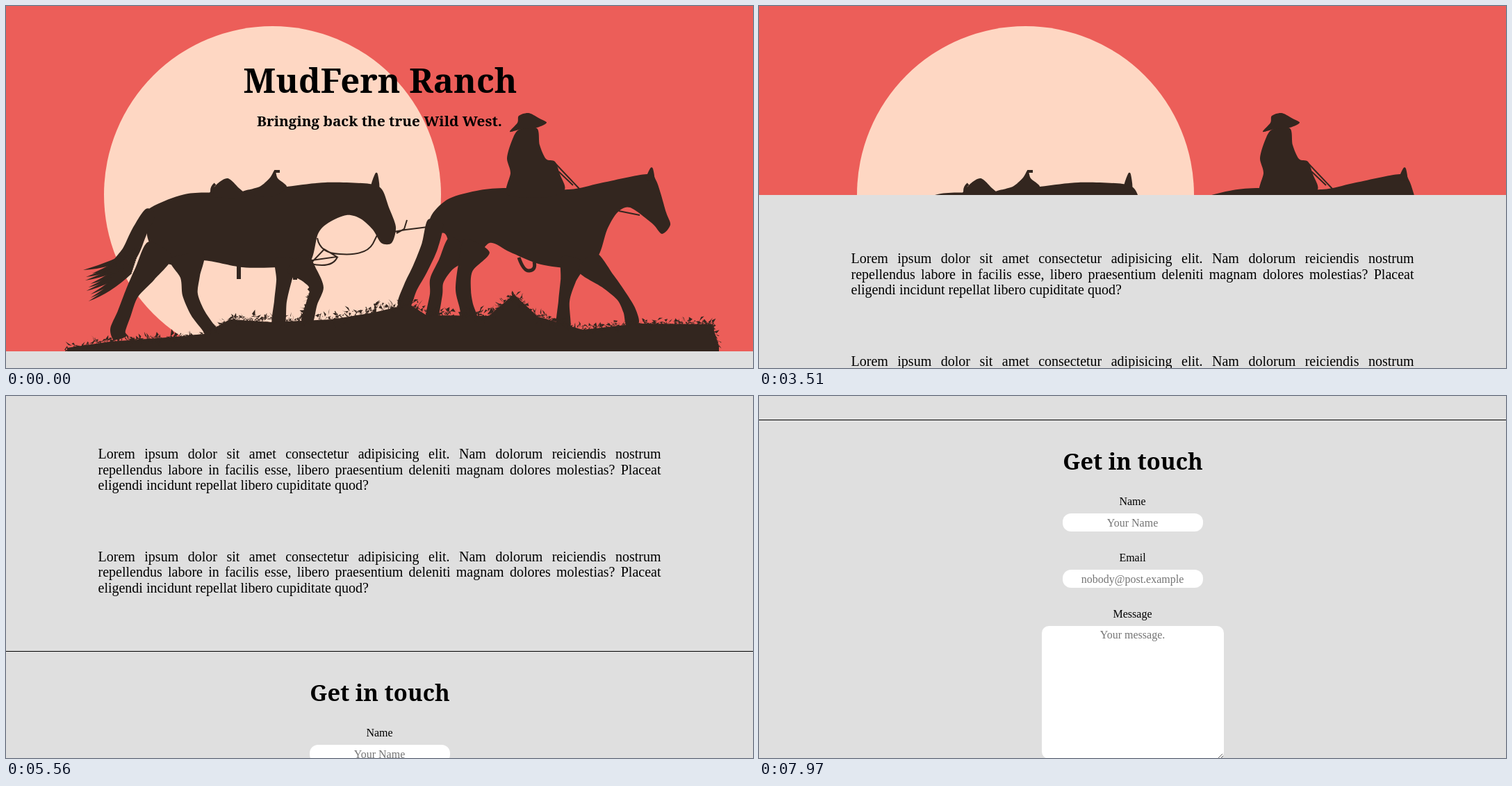
Write an HTML page that moves like this. It is 1075 px wide and 521 px high and loops after 8 s.

```html
<!DOCTYPE html>
<html lang="en">
<head>
<meta charset="utf-8">
<title>MudFern Ranch</title>
<style>
  html, body { margin: 0; width: 100%; height: 100%; overflow: hidden; }
  #stage { position: relative; width: 1075px; height: 521px; overflow: clip; contain: strict; background: #ec5e59; }
  svg, #page, p { position: absolute; left: 0; top: 0; }
  p { left: 132.5px; width: 810px; margin: 0; text-align: justify;
      font: 20px/22.5px "Liberation Serif", serif; color: #000; }
  text { text-anchor: middle; font: 16px "Liberation Serif", serif; }
  .show { font-family: "Noto Serif", serif; font-weight: 700; }
  .hint { fill: #757575; }
</style>
</head>
<body>
<div id="stage">
  <svg width="1075" height="521">
    <circle cx="383.5" cy="271.5" r="242.5" fill="#fed7c3"/>
    <g id="scene" fill="#33261f"></g>
    <g fill="none" stroke="#33261f" stroke-width="2">
      <path d="M448 334Q452 356 480 357Q518 360 528 342L534 330M438 371L458 350L476 361L440 366M438 371Q470 378 477 361"/>
      <path d="M558 325L575 322L607 318M562 327L573 321L577 308"/>
      <path d="M788 224L826 264M795 238L816 258M882 295L912 301"/>
      <path d="M301 256Q294 262 297 271M386 238h8" stroke-width="4"/>
      <path d="M738 362Q745 382 753 381Q763 380 760 368" stroke-width="5"/>
      <path d="M335 372V393M416 384V394" stroke-width="6"/>
    </g>
  </svg>
  <div id="page">
    <svg width="1075" height="1400">
      <text class="show" x="538.5" y="125" style="font-size:49px">MudFern Ranch</text>
      <text class="show" x="537.5" y="173" style="font-size:20.7px">Bringing back the true Wild West.</text>
      <rect y="497" width="1075" height="903" fill="#dfdfdf"/>
      <rect y="872" width="1075" height="1"/>
      <text class="show" x="538" y="944" style="font-size:32.7px">Get in touch</text>
      <g fill="#fff">
        <rect x="437" y="1007" width="202" height="26" rx="12"/>
        <rect x="437" y="1088" width="202" height="26" rx="12"/>
        <rect x="407" y="1169" width="262" height="191" rx="10"/>
      </g>
      <text x="537.5" y="995">Name</text>
      <text x="537.5" y="1026" class="hint">Your Name</text>
      <text x="537.5" y="1076">Email</text>
      <text x="537.5" y="1107" class="hint">nobody@post.example</text>
      <text x="537.5" y="1157">Message</text>
      <text x="537.5" y="1187" class="hint">Your message.</text>
      <path d="M661 1359l6 -6M665 1359l3 -3" stroke="#666"/>
    </svg>
  </div>
</div>
<script>
const scene = document.getElementById('scene');
const page = document.getElementById('page');
const parse = text => text.trim().split(/\s+/).map(p => p.split(',').map(Number));

let seed = 7;
const rand = () => (seed = seed * 16807 % 2147483647) / 2147483647;

function addPath(d) {
  const path = document.createElementNS('http://www.w3.org/2000/svg', 'path');
  path.setAttribute('d', d);
  scene.append(path);
}

// Closed smooth curve through the given points
function blob(pts) {
  const at = i => pts[(i + pts.length) % pts.length];
  const mix = (p, a, b) => [0, 1].map(k => p[k] + (a[k] - b[k]) / 7);
  let d = 'M' + pts[0];
  pts.forEach((p, i) => {
    const q = at(i + 1);
    d += `C${mix(p, q, at(i - 1))} ${mix(q, p, at(i + 2))} ${q}`;
  });
  addPath(d + 'z');
}
const shape = text => blob(parse(text));

// Tapered limb along a centre line of x,y,radius points
function limb(text) {
  const pts = parse(text), left = [], right = [];
  pts.forEach(([x, y, r], i) => {
    const a = pts[Math.max(i - 1, 0)], b = pts[Math.min(i + 1, pts.length - 1)];
    const angle = Math.atan2(b[1] - a[1], b[0] - a[0]);
    const dx = r * Math.sin(angle), dy = r * Math.cos(angle);
    left.push([x + dx, y - dy]);
    right.unshift([x - dx, y + dy]);
  });
  blob(left.concat(right));
}

// Leafy edge from one point to another
function leaves([x0, y0], [x1, y1], height) {
  const jit = () => (rand() - .5) * 12;
  let d = '';
  for (let n = Math.hypot(x1 - x0, y1 - y0); n > 0; n--) {
    const u = rand();
    d += `M${x0 + (x1 - x0) * u},${y0 + (y1 - y0) * u + 3 - rand() * height}l${jit()},${jit()}l${jit()},${jit()}z`;
  }
  addPath(d);
}

// Pack horse
shape(`202,300 216,286 262,270 330,268 404,260 460,254 523,256 541,264 551,290 561,318 555,341 540,341
  528,322 510,306 490,301 464,312 449,328 436,370 392,376 340,376 283,366 236,372 206,340`);
shape('294,274 303,257 319,248 334,261 345,275');
shape('340,268 365,260 380,247 387,236 391,248 404,261 380,275');
limb('531,262,6 533,242,2');
limb('222,350,20 200,385,16 181,414,10 170,443,10 161,466,11 164,478,9');
limb('260,360,24 265,390,14 265,415,11 275,440,10 289,460,9 302,478,9');
limb('404,365,16 400,395,11 395,425,9 392,460,9');
limb('418,368,18 437,388,13 447,406,10 440,428,8 433,455,8');
limb('208,296,8 192,325,11 179,354,12 160,378,10');
for (let i = 0; i < 10; i++) {
  const x = 111 + rand() * 14, y = 380 + i * 5;
  addPath(`M${188 - i},${348 + i * 3}Q155,${367 + i * 4} ${x},${y}Q150,${378 + i * 4} ${190 - i},${358 + i * 3}z`);
}

// Lead horse
shape(`606,330 613,300 638,277 682,265 722,262 810,264 855,255 922,242 936,252 950,297 956,315 944,328
  930,313 898,290 880,297 865,322 852,360 825,377 770,372 725,354 696,341 672,368 645,366 632,328`);
limb('927,250,6 929,234,2');
limb('655,345,20 633,372,12 620,395,10 619,415,9 612,452,8');
limb('678,345,20 661,378,11 658,408,11 662,430,10 669,455,10');
limb('817,365,17 809,395,11 803,425,8 802,466,10');
limb('836,368,18 866,396,12 886,418,8 897,438,9 902,458,9');
limb('618,310,11 610,345,12 596,378,11 582,405,10 572,432,9');

// Rider
shape('738,178 764,176 768,200 777,220 790,224 797,242 804,264 780,275 722,272 726,240 721,219 728,194');
shape('725,181 736,168 738,158 752,154 768,162 778,168 764,175 742,177');

// Ground profile: x, y, height of the growth that follows
const ground = parse(`88,492,6 150,483,5 245,476,4 285,472,5 322,451,9 382,455,9 470,451,10 530,441,14 580,429,14
  605,445,10 695,446,6 731,415,5 765,447,7 830,466,8 910,457,8 1016,458,8 1026,490,5`);
addPath('M88,521L' + ground.map(([x, y]) => [x, y]).join('L') + 'V521z');
ground.slice(1).forEach((p, i) => leaves(ground[i], p, ground[i][2]));
leaves([428, 450], [440, 416], 8);

for (const top of [577, 724.5]) {
  const p = document.createElement('p');
  p.style.top = top + 'px';
  p.textContent = 'Lorem ipsum dolor sit amet consectetur adipisicing elit. Nam dolorum reiciendis nostrum ' +
    'repellendus labore in facilis esse, libero praesentium deleniti magnam dolores molestias? Placeat ' +
    'eligendi incidunt repellat libero cupiditate quod?';
  page.append(p);
}

// Scroll offset at a few times, eased in between
const keys = [[460, 0], [1430, 49], [2820, 139], [4110, 314], [4840, 441], [5420, 490], [6240, 588], [7970, 838]];
function slope(i) {
  const a = keys[Math.max(i - 1, 0)], b = keys[Math.min(i + 1, keys.length - 1)];
  return (b[1] - a[1]) / (b[0] - a[0]);
}
function scrollAt(time) {
  if (time < 500) return 0;
  const t = Math.min(time, 7970);
  const i = keys.findIndex(key => key[0] >= t) - 1;
  const [t0, s0] = keys[i], [t1, s1] = keys[i + 1];
  const w = t1 - t0, u = (t - t0) / w, v = 1 - u;
  return s0 * v * v * (1 + 2 * u) + s1 * u * u * (3 - 2 * u) + w * u * v * (slope(i) * v - slope(i + 1) * u);
}

function draw() {
  page.style.top = -Math.round(scrollAt(performance.now() % 8000)) + 'px';
  requestAnimationFrame(draw);
}
draw();
</script>
</body>
</html>
```
